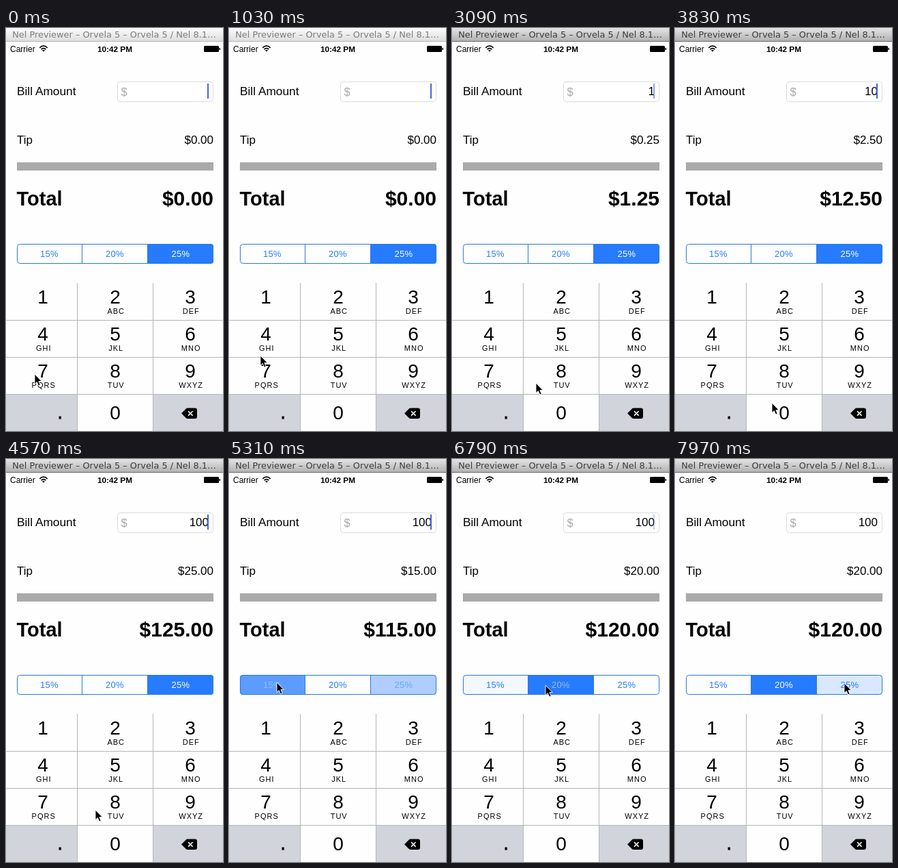
These frames come from a looping animation (318 px wide and 588 px high, 8000 ms). An HTML page:

```html
<!DOCTYPE html>
<html lang="en">
<head>
<meta charset="utf-8">
<title>Tip calculator</title>
<style>
  html, body { margin: 0; width: 100%; height: 100%; overflow: hidden; background: #fefefe; }
  svg { display: block; width: 318px; height: 588px; font: 17px "Liberation Sans", Arial, sans-serif; }
  .title { font: 12.9px "DejaVu Sans", sans-serif; text-anchor: middle; }
  .status { font-size: 12px; }
  .right { text-anchor: end; }
  .big { font-weight: bold; font-size: 30px; }
  .digit { font-size: 28px; text-anchor: middle; }
  .letters { font-size: 11px; letter-spacing: 1px; text-anchor: middle; }
  .segment { font-size: 13px; letter-spacing: .3px; text-anchor: middle; }
  .rule { stroke: #b6b6b6; fill: none; }
</style>
</head>
<body>
<svg viewBox="0 0 318 588">
  <defs>
    <linearGradient id="idleBar" x2="0" y2="1">
      <stop stop-color="#fbfbfb"/><stop offset="1" stop-color="#dedede"/>
    </linearGradient>
    <linearGradient id="activeBar" x2="0" y2="1">
      <stop stop-color="#e4e4e4"/><stop offset="1" stop-color="#b2b2b2"/>
    </linearGradient>
    <clipPath id="pill"><rect x="16" y="315" width="288" height="29" rx="4"/></clipPath>
  </defs>
  <rect width="318" height="588" fill="#fefefe"/>

  <rect id="bar" width="318" height="19"/>
  <rect id="barEdge" y="19" width="318" height="1"/>
  <text id="title" class="title" x="158.5" y="14">Nel Previewer – Orvela 5 – Orvela 5 / Nel 8.1…</text>

  <g class="status">
    <text x="6" y="34.5">Carrier</text>
    <text x="159.5" y="34.5" text-anchor="middle" font-weight="bold" font-size="11.8">10:42 PM</text>
    <g fill="none" stroke="#000" stroke-width="1.7">
      <path d="M49.3 28.8Q55 23.6 60.7 28.8M51.5 31.2Q55 28 58.5 31.2"/>
    </g>
    <path d="M53 32.6Q55 31 57 32.6L55 34.8Z"/>
    <rect x="290" y="26" width="22" height="9" rx="1.5"/>
    <rect x="312.5" y="29" width="1.5" height="3"/>
  </g>

  <text x="16" y="98" font-size="17.3">Bill Amount</text>
  <rect x="163.5" y="78.5" width="140" height="29" rx="4" fill="#fff" stroke="#dcdcdc"/>
  <text x="168.5" y="98.5" font-size="16.5" fill="#a8a8a8">$</text>
  <text id="bill" class="right" x="297" y="98"></text>
  <rect id="caret" x="295" y="81" width="2" height="22" fill="#4666d8"/>

  <text x="16" y="169">Tip</text>
  <text id="tip" class="right" x="304" y="169"></text>
  <rect x="16" y="196" width="288" height="12" fill="#aaa"/>
  <text class="big" x="15.5" y="258.5" style="font-size:29px">Total</text>
  <text id="total" class="big right" x="304" y="258.5"></text>

  <g id="segments" clip-path="url(#pill)"></g>
  <rect x="16.5" y="315.5" width="287" height="28" rx="4" fill="none" stroke="#2c78dc"/>

  <g id="keys"></g>
  <path class="rule" d="M104.5 372V588M215.5 372V588M0 426.5H318M0 480.5H318M0 534.5H318"/>
  <path d="M257 562.3L264 555.2Q264.8 554.5 266 554.5H277Q280 554.5 280 557.5V567Q280 570 277 570H266Q264.8 570 264 569.3Z"/>
  <path d="M267 559L273.6 565.6M273.6 559L267 565.6" stroke="#fff" stroke-width="1.5"/>
  <rect x="77.5" y="566.5" width="3.4" height="4"/>

  <path id="mouse" d="M0 0V14.5L3.3 11.5L5.7 17L8.2 16L5.9 10.6H10.3Z" stroke="#fff" stroke-width=".9"/>
</svg>
<script>
const LOOP = 8000, TICK = 147.5;
const BLUE = [38, 123, 255];
const $ = id => document.getElementById(id);

function add(parent, tag, attrs, text = '') {
  const el = document.createElementNS('http://www.w3.org/2000/svg', tag);
  for (const name in attrs) el.setAttribute(name, attrs[name]);
  el.textContent = text;
  return $(parent).appendChild(el);
}

// Timelines: [tick, value...]; step tracks hold, the mouse path eases.
const caretTrack = [[0, 1], [2, .5], [3, 0], [5, .5], [6, 1], [9, .5], [10, 0], [12, 1],
  [21, .6], [22, 0], [24, 1], [32, .5], [33, 0], [36, 1], [39, .5], [40, 0], [43, 1],
  [46, .3], [47, 0], [49, .5], [50, 1], [53, .4], [54, 0]];
const billTrack = [[0, ''], [17, '1'], [25, '10'], [29, '100']];
const rateTrack = [[0, 25], [36, 15], [45, 20]];
const keyTrack = [[0, null], [16, '1'], [17, null], [24, '0'], [25, null], [28, '0'], [29, null]];
const segmentTracks = [
  { label: '15%', x: 16, w: 95, fill: [[0, 0], [36, .75], [37, 1], [45, .4], [46, .05], [47, 0]],
    white: [[0, 0], [36, .5], [37, 1], [45, .3], [46, 0]] },
  { label: '20%', x: 111, w: 97, fill: [[0, 0], [44, .17], [45, .75], [46, 1]],
    white: [[0, 0], [45, .3], [46, .5], [47, 1]] },
  { label: '25%', x: 208, w: 96, fill: [[0, 1], [36, .37], [37, 0], [54, .17]],
    white: [[0, 1], [36, .3], [37, 0]] }
];
const mousePath = [[4, 42, 505], [13, 57, 402], [17, 57, 402], [21, 123, 518], [23, 142, 547],
  [30, 142, 547], [34, 70, 326], [38, 70, 326], [42, 137, 330], [48, 137, 330], [52, 248, 327]];

const held = (track, tick) => track.filter(step => step[0] <= tick).pop()[1];

function mouseAt(tick) {
  const next = mousePath.findIndex(p => p[0] > tick);
  if (next < 0) return mousePath[mousePath.length - 1].slice(1);
  if (next === 0) return mousePath[0].slice(1);
  const [t0, x0, y0] = mousePath[next - 1], [t1, x1, y1] = mousePath[next];
  const u = (tick - t0) / (t1 - t0), e = u * u * (3 - 2 * u);
  return [x0 + (x1 - x0) * e, y0 + (y1 - y0) * e];
}

const columns = [[0, 104, 54], [105, 110, 160], [216, 102, 270]];
const letters = ['', 'ABC', 'DEF', 'GHI', 'JKL', 'MNO', 'PQRS', 'TUV', 'WXYZ'];
const keyFaces = {};

function addKey(label, col, row) {
  const [x, width, cx] = columns[col], y = 372 + row * 54;
  keyFaces[label] = add('keys', 'rect', { x, y, width, height: 54 });
  add('keys', 'text', { class: 'digit', x: cx, y: y + (row < 3 ? 30 : 37) }, label);
  add('keys', 'text', { class: 'letters', x: cx + 1.2, y: y + 45 }, letters[label - 1]);
}
for (let n = 0; n < 9; n++) addKey(String(n + 1), n % 3, Math.floor(n / 3));
addKey('0', 1, 3);
for (const [x, width] of [columns[0], columns[2]])
  add('keys', 'rect', { x, y: 534, width, height: 54, fill: '#d1d4db' });

for (const s of segmentTracks) {
  s.face = add('segments', 'rect', { x: s.x, y: 315, width: s.w, height: 29, fill: `rgb(${BLUE})` });
  s.text = add('segments', 'text', { class: 'segment', x: s.x + s.w / 2, y: 334 }, s.label);
}
add('segments', 'path', { d: 'M111.5 315V344M207.5 315V344', stroke: '#2c78dc' });

function render(tick) {
  const active = tick >= 15;
  $('bar').setAttribute('fill', `url(#${active ? 'activeBar' : 'idleBar'})`);
  $('barEdge').setAttribute('fill', active ? '#686868' : '#b4b4b4');
  $('title').setAttribute('fill', active ? '#3c3c3c' : '#7c7c7c');

  const bill = held(billTrack, tick), tip = bill * held(rateTrack, tick) / 100;
  $('bill').textContent = bill;
  $('tip').textContent = '$' + tip.toFixed(2);
  $('total').textContent = '$' + (+bill + tip).toFixed(2);
  $('caret').setAttribute('opacity', held(caretTrack, tick));

  const pressed = held(keyTrack, tick);
  for (const label in keyFaces)
    keyFaces[label].setAttribute('fill', label === pressed ? '#d1d4db' : '#fefefe');

  for (const s of segmentTracks) {
    const white = held(s.white, tick);
    s.face.setAttribute('opacity', held(s.fill, tick));
    s.text.setAttribute('fill', `rgb(${BLUE.map(c => Math.round(c + (255 - c) * white))})`);
  }
  $('mouse').setAttribute('transform', `translate(${mouseAt(tick).map(Math.round)})`);
}

function frame() {
  render(Math.floor((performance.now() % LOOP + 10) / TICK));
  requestAnimationFrame(frame);
}
frame();
</script>
</body>
</html>
```
